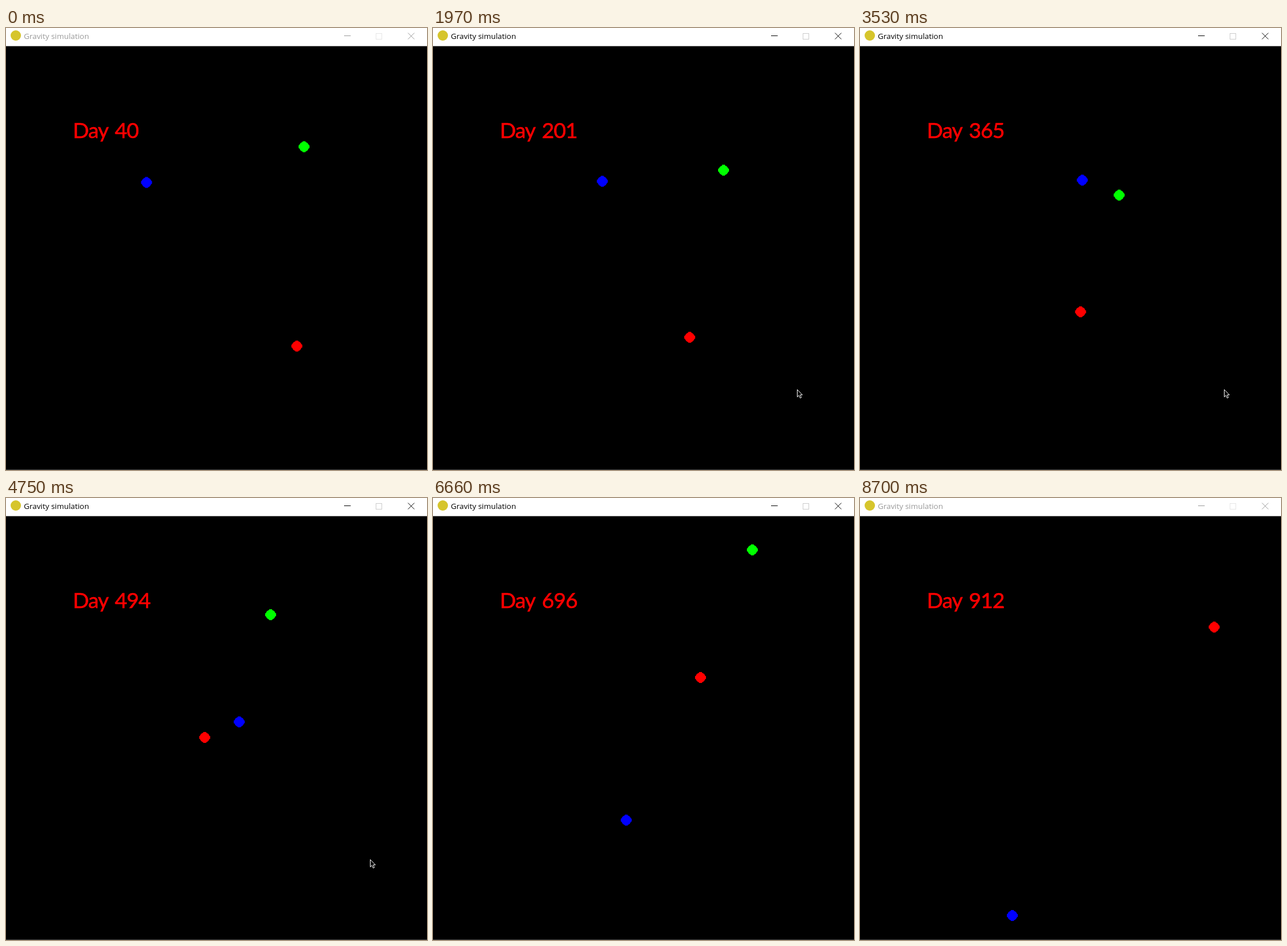
Write an HTML page that moves like this. It is 731 by 767 pixels and loops after 8750 ms.

```html
<!DOCTYPE html>
<html lang="en">
<head>
<meta charset="utf-8">
<title>Gravity simulation</title>
<style>
  html, body { margin: 0; width: 100%; height: 100%; overflow: hidden; background: #000; }
  svg { display: block; }
  .caption { font: 13.4px "Open Sans", "Noto Sans", sans-serif; fill: #000; }
  .day { font: 37px "Comic Sans MS", Lato, sans-serif; letter-spacing: -1px; fill: #f00; stroke: #f00; stroke-width: .6; }
  .buttons { fill: none; stroke: #000; }
  .disabled { stroke: #ccc; }
  .inactive .caption { fill: #999; }
  .inactive .buttons { stroke: #999; }
  .inactive .disabled { stroke: #e6e6e6; }
</style>
</head>
<body>
<svg width="731" height="767" viewBox="0 0 731 767">
  <defs>
    <g id="ball">
      <circle r="8.7" stroke="none"/>
      <path d="M-9.5 0H9.5M0-9.5V9.5" stroke-width="5"/>
    </g>
  </defs>
  <rect width="731" height="767"/>
  <text class="day" y="191"><tspan x="116">Day</tspan> <tspan id="count" x="189">40</tspan></text>
  <use class="body" href="#ball" fill="#f00" stroke="#f00"/>
  <use class="body" href="#ball" fill="#0f0" stroke="#0f0"/>
  <use class="body" href="#ball" fill="#00f" stroke="#00f"/>
  <rect y="766" width="731" height="1" fill="#444"/>
  <path id="cursor" d="M.5.5V13.2L3.4 10.5 5.5 15.2 7.6 14.3 5.6 9.7H9.4Z" fill="#000" stroke="#fff"/>
  <g id="bar">
    <rect width="731" height="31.5" fill="#fff"/>
    <circle cx="17" cy="13" r="9" fill="#d6c52c"/>
    <text class="caption" x="31" y="19">Gravity simulation</text>
    <g class="buttons">
      <path d="M587 13.5H598.5"/>
      <rect class="disabled" x="642.5" y="9.5" width="10" height="10"/>
      <path d="M698 8.5 709 19.5M709 8.5 698 19.5"/>
    </g>
  </g>
</svg>
<script>
const LOOP = 8750;
const STEP = 46.3; // ms between screen updates
const FOCUS = { from: 700, to: 8450 };
const CURSOR = { x: 632, y: 627, from: 650, to: 6250 };

// Key poses: ms, day, then x, y of the red, green and blue body
const poses = [
  [0, 40, 505, 552, 517.5, 206, 244, 268],
  [1280, 129, 473, 546, 513, 229, 269, 268],
  [2660, 273, 418, 522, 488, 265, 327, 264],
  [3530, 365, 383, 492.5, 450, 290, 386, 264],
  [3974, 412, 366, 472, 414, 282, 431, 282],
  [4239, 440, 357, 456, 430, 246, 428, 318],
  [4750, 494, 345, 415.5, 459.5, 202.5, 405, 388.5],
  [5459, 569, 377, 368, 497, 157.5, 379, 457.5],
  [6660, 696, 464.5, 311.5, 554.5, 90, 335.5, 559],
  [8700, 912, 615, 224, 653, -20, 264.5, 724.5]
];

const count = document.getElementById("count");
const cursor = document.getElementById("cursor");
const bar = document.getElementById("bar");
const bodies = document.querySelectorAll(".body");

const lerp = (a, b, u) => a + (b - a) * u;
const move = (node, x, y) => node.setAttribute("transform", `translate(${x} ${y})`);

// Speed per day at pose i, weighted between its two neighbours
function slope(i, c) {
  const days = k => poses[k + 1][1] - poses[k][1];
  const rate = k => (poses[k + 1][c] - poses[k][c]) / days(k);
  if (i === 0) return rate(0);
  if (i === poses.length - 1) return rate(i - 1);
  return lerp(rate(i - 1), rate(i), days(i - 1) / (days(i - 1) + days(i)));
}

// Cubic Hermite curve from pose i to the next
function curve(i, u, c) {
  const a = poses[i], b = poses[i + 1], h = b[1] - a[1], v = 1 - u;
  return v * v * (1 + 2 * u) * a[c] + u * u * (3 - 2 * u) * b[c]
    + h * u * v * (v * slope(i, c) - u * slope(i + 1, c));
}

function draw(t) {
  let i = poses.length - 2;
  while (poses[i][0] > t) i--;
  const a = poses[i], b = poses[i + 1], span = b[0] - a[0];
  const steps = Math.round(span / STEP);
  const u = Math.min(1, Math.floor((t - a[0]) / span * steps + 1e-6) / steps);
  const ms = lerp(a[0], b[0], u);

  count.textContent = Math.round(lerp(a[1], b[1], u));
  bodies.forEach((body, k) => move(body, curve(i, u, 2 + 2 * k), curve(i, u, 3 + 2 * k)));

  // The pointer comes in from below, rests, and leaves the same way
  const away = Math.max(0, CURSOR.from - ms, ms - CURSOR.to) / 130;
  move(cursor, Math.round(CURSOR.x + 16 * away), Math.round(CURSOR.y + 22 * away * away));
  bar.classList.toggle("inactive", ms < FOCUS.from || ms >= FOCUS.to);
}

const start = performance.now();
function frame() {
  draw((performance.now() - start) % LOOP);
  requestAnimationFrame(frame);
}
frame();
</script>
</body>
</html>
```
